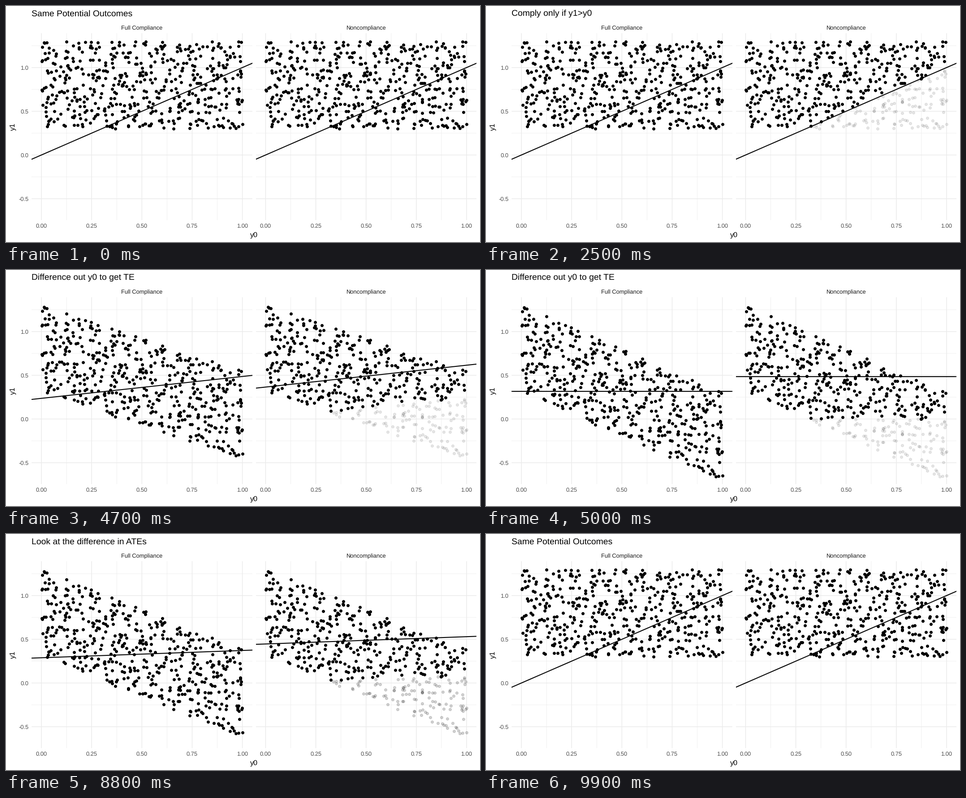
A matplotlib script that plays this animation: 1058x529 px, repeating every 10 s.

```python
import matplotlib.pyplot as plt
import numpy as np
from matplotlib.animation import FuncAnimation

W, H, DPI = 1058, 529, 64
PX = 72 / DPI  # points per pixel
FRAMES, INTERVAL = 100, 100

# Panel geometry in pixels
LEFT, PANEL_W, STEP = 57.3, 492.4, 500.4
TOP, BOTTOM = 61.2, 480.2
X0, X_UNIT = 79.0, 448.6
Y0, Y_UNIT = 334.0, 196.0

TITLE_SIZE, AXIS_SIZE, TEXT_SIZE = 19.4, 16.17, 12.93
TITLES = ["Same Potential Outcomes", "Comply only if y1>y0",
          "Difference out y0 to get TE", "Look at the difference in ATEs"]
PANELS = [("Full Compliance", 0.315), ("Noncompliance", 0.487)]

plt.rcParams["font.family"] = "Liberation Sans"
plt.rcParams["text.hinting"] = "none"


def to_x(px):
    return (px - X0) / X_UNIT


def to_y(py):
    return (Y0 - py) / Y_UNIT


def make_points(total=500, cols=10, rows=5):
    """Uniform outcomes, spread evenly over coarse cells, with fixed extremes."""
    rng = np.random.default_rng(7)
    cell = np.arange(total) % (cols * rows)
    x = (cell % cols + rng.random(total)) / cols
    y = 0.3 + (cell // cols + rng.random(total)) / rows
    extremes = [(0.002, 1.07), (0.016, 1.282), (0.03, 0.325),
                (0.52, 1.295), (0.98, 1.294), (1.0, 0.35)]
    return np.vstack([np.column_stack([x, y]), extremes]).T


def label(x, y, text, size, color="black", ha="center", rotation=0):
    return fig.text(x / W, 1 - y / H, text, fontsize=size * PX, color=color,
                    ha=ha, va="baseline", rotation=rotation,
                    rotation_mode="anchor")


def draw_grid(ax):
    for draw, values in ((ax.axvline, np.arange(9) / 8),
                         (ax.axhline, np.arange(-2, 6) / 4)):
        for i, value in enumerate(values):
            major = i % 2 == 0
            draw(value, color="#EBEBEB", lw=(1.57 if major else 0.79) * PX,
                 zorder=int(major), snap=False)


def dots(ax, x, y):
    return ax.scatter(x, y, s=(5.9 * PX) ** 2, facecolor="black",
                      edgecolor="black", linewidths=1.04 * PX, zorder=2)


def make_panel(index):
    left = LEFT + index * STEP
    ax = fig.add_axes([left / W, 1 - BOTTOM / H, PANEL_W / W, (BOTTOM - TOP) / H])
    ax.set_xlim(to_x(LEFT), to_x(LEFT + PANEL_W))
    ax.set_ylim(to_y(BOTTOM), to_y(TOP))
    ax.axis("off")
    draw_grid(ax)
    name, mean = PANELS[index]
    label(left + PANEL_W / 2, 52.8, name, TEXT_SIZE, "#1A1A1A")
    for tick in np.arange(5) / 4:
        label(X0 + index * STEP + tick * X_UNIT, 497.2, f"{tick:.2f}",
              TEXT_SIZE, "#4D4D4D")
    line, = ax.plot([], [], color="black", lw=2.1 * PX, zorder=3)
    return ax, line, mean


fig = plt.figure(figsize=(W / DPI, H / DPI), dpi=DPI, facecolor="white")
title = label(LEFT, 22.4, TITLES[0], TITLE_SIZE, ha="left")
label(553.6, 517.3, "y0", AXIS_SIZE)
label(19.7, 270.7, "y1", AXIS_SIZE, rotation=90)
for tick in np.arange(-1, 3) / 2:
    label(50.2, Y0 - tick * Y_UNIT + 4.7, f"{tick:.1f}", TEXT_SIZE, "#4D4D4D",
          ha="right")

y0, y1 = make_points()
comply = y1 > y0
everyone = np.full(len(y0), True)
panels = [make_panel(i) for i in range(2)]
full_ax, part_ax = panels[0][0], panels[1][0]

# Each cloud keeps its own base coordinates
clouds = [(dots(ax, y0[mask], y1[mask]), y0[mask], y1[mask])
          for ax, mask in ((full_ax, everyone), (part_ax, comply), (part_ax, ~comply))]
faded = clouds[2][0]


def progress(frame, start, steps):
    return min(max((frame - start + 1) / steps, 0), 1)


def update(frame):
    stages = [progress(frame, 13, 13), progress(frame, 39, 12),
              progress(frame, 64, 12), progress(frame, 88, 12)]
    fade = stages[0] - stages[3]
    shift = stages[1] - stages[3]

    title.set_text(TITLES[sum(s >= 0.5 for s in stages) % len(TITLES)])
    for cloud, x, y in clouds:
        cloud.set_offsets(np.column_stack([x, y - shift * x]))
    faded.set_alpha(1 - 0.9 * fade)
    for ax, line, mean in panels:
        ends = np.array(ax.get_xlim())
        line.set_data(ends, (1 - shift) * ends + shift * mean)
    return [title]


anim = FuncAnimation(fig, update, frames=FRAMES, interval=INTERVAL,
                     repeat=True, repeat_delay=0, blit=False)
plt.show()
```
